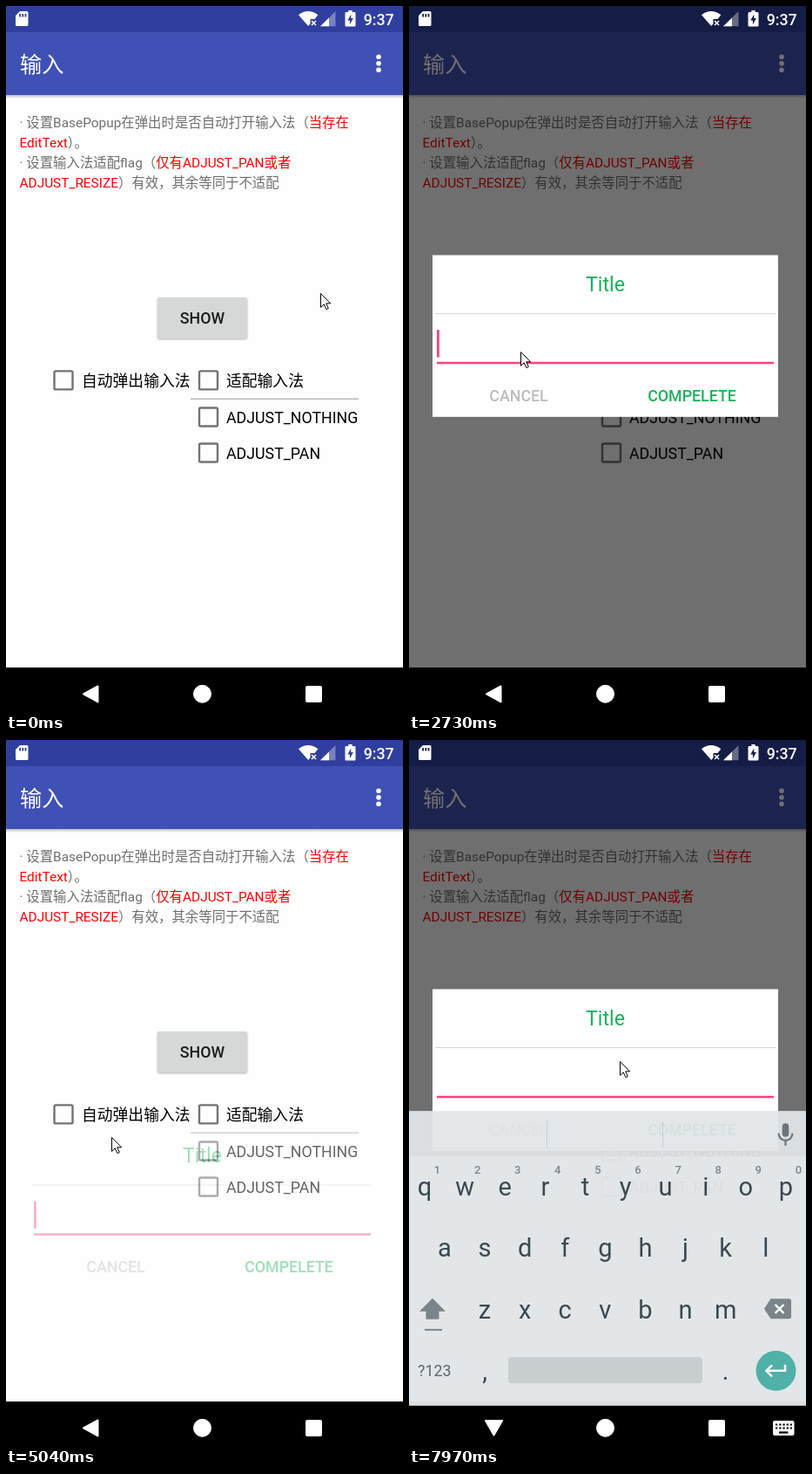
These frames come from a looping animation (456 by 809 pixels, 7990 ms). An HTML page:

```html
<!DOCTYPE html>
<html lang="zh-CN">
<head>
<meta charset="utf-8">
<style>
html, body { margin: 0; width: 100%; height: 100%; overflow: hidden; background: #000; }
svg { display: block; width: 456px; height: 809px; }
text { font-family: Roboto, 'Noto Sans CJK SC', 'Noto Sans CJK', sans-serif; font-size: 17.8px; white-space: pre; }
.med { font-weight: 500; }
.mid { text-anchor: middle; }
.note { font-size: 15.4px; fill: #6e6e6e; }
.note tspan { fill: #f00; }
.box { fill: none; stroke: #737373; stroke-width: 2.4; }
.key { font-size: 29px; fill: #37474f; text-anchor: middle; }
.hint { font-size: 13px; font-weight: 500; fill: #7d878c; text-anchor: middle; }
</style>
</head>
<body>
<svg viewBox="0 0 456 809" xmlns="http://www.w3.org/2000/svg">
  <defs>
    <linearGradient id="fall" x2="0" y2="1">
      <stop offset="0" stop-opacity=".32"/><stop offset="1" stop-opacity="0"/>
    </linearGradient>
  </defs>

  <g id="app">
    <rect width="456" height="758" fill="#fefefe"/>
    <rect y="101" width="456" height="5" fill="url(#fall)"/>
    <rect width="456" height="102" fill="#3f51b5"/>
    <rect width="456" height="30" fill="#303f9f"/>
    <text x="16" y="76" style="font-size:25.2px" fill="#fff">输入</text>
    <g fill="#fff">
      <circle cx="428" cy="58.3" r="2.8"/><circle cx="428" cy="65.8" r="2.8"/><circle cx="428" cy="73.3" r="2.8"/>
    </g>
    <text class="note" x="15.5" y="139">· 设置BasePopup在弹出时是否自动打开输入法（<tspan>当存在</tspan></text>
    <text class="note" x="15.5" y="162"><tspan>EditText</tspan>）。</text>
    <text class="note" x="15.5" y="185">· 设置输入法适配flag（<tspan>仅有ADJUST_PAN或者</tspan></text>
    <text class="note" x="15.5" y="208"><tspan>ADJUST_RESIZE</tspan>）有效，其余等同于不适配</text>
    <rect id="btn" x="174" y="334" width="103" height="47" rx="2" fill="#d6d7d7"/>
    <rect id="btnInk" x="174" y="334" width="103" height="47" rx="2" opacity="0"/>
    <text class="med mid" x="225.5" y="364" fill="#1c1c1c">SHOW</text>
    <path d="M212 450.2H405" stroke="#b9b9b9" stroke-width="1.6"/>
    <circle id="ripple" cx="66" cy="429" r="25" fill="#ff4081" opacity="0"/>
    <g id="boxes"></g>
    <g id="tick">
      <rect x="54.3" y="417.2" width="23.4" height="23.4" rx="2.5" fill="#ff4081"/>
      <path id="mark" d="M58.5 429.5l5.2 5.2L74 424" fill="none" stroke="#fff" stroke-width="2.4" stroke-dasharray="23"/>
    </g>
    <text x="87" y="435.5">自动弹出输入法</text>
    <text x="253" y="435.5">适配输入法</text>
    <text x="253" y="478">ADJUST_NOTHING</text>
    <text x="253" y="519">ADJUST_PAN</text>
  </g>

  <rect id="dim" width="456" height="758" opacity="0"/>

  <g id="dialog">
    <rect x="27" y="285.5" width="397" height="185.3" fill="#fff"/>
    <text class="mid" x="225.5" y="326.5" style="font-size:23.2px" fill="#1bb25c">Title</text>
    <path d="M30 352.5H421" stroke="#d6d6d6"/>
    <path id="line" d="M32 409H419"/>
    <rect id="caret" x="32" y="371" width="2.8" height="31.5" fill="#ff4081"/>
    <text class="med mid" x="126" y="452.5" fill="#bdbdbd">CANCEL</text>
    <text class="med mid" x="325" y="452.5" fill="#1bb25c">COMPELETE</text>
  </g>

  <g fill="#fff">
    <path fill-rule="evenodd" d="M16 6h8q1.5 0 1.5 1.5v14q0 1.5-1.500 1.500h-11.500q-1.500 0-1.500-1.500V11zM15.200 9v3.500h1.800V9zM18.400 9v3.500h1.800V9zM21.600 9v3.500h1.800V9z"/>
    <path d="M336 10.200Q347 1.800 358.300 10.200L354.500 15H349.500V20.300L347.200 23z"/>
    <path d="M351 17l5 5m0-5l-5 5" stroke="#fff" stroke-width="1.5"/>
    <path d="M361 23.200L378.500 6V23.200z" opacity=".35"/>
    <path d="M361 23.200L371 13.400V23.200z"/>
    <path fill-rule="evenodd" d="M393.300 5h4.400v2h2.600q1.200 0 1.200 1.200v14q0 1.200-1.200 1.200h-9.600q-1.200 0-1.200-1.200V8.200q0-1.200 1.200-1.200h2.600zM396.300 9.500l-4 7h2.600v4.800l4-7.300h-2.600z"/>
    <text class="med" x="410.700" y="21.500">9:37</text>
  </g>

  <rect y="758" width="456" height="51"/>
  <g id="keyboard">
    <rect y="420.500" width="456" height="388.500" fill="#eceff1"/>
    <rect y="420.500" width="456" height="51.500" fill="#e2e6e9"/>
    <rect y="758" width="456" height="140"/>
    <path d="M158.500 432v31M291.500 432v31" stroke="#c6cccf"/>
    <rect x="428.700" y="434.500" width="7.600" height="15.500" rx="3.800" fill="#6b767b"/>
    <path d="M424.500 446a8 8 0 0 0 16 0M432.500 454v6" fill="none" stroke="#6b767b" stroke-width="2.200"/>
    <g id="keys"></g>
    <path d="M27 635L42 650H34.500V659H19.500V650H12z" fill="#7b868b"/>
    <path d="M18 671H38" stroke="#7b868b" stroke-width="2"/>
    <path d="M415.500 635.500H436.500q2.500 0 2.500 2.500v18q0 2.500-2.500 2.500H415.500L408 647z" fill="#7b868b"/>
    <path d="M420.500 642l10 10m0-10l-10 10" stroke="#fff" stroke-width="2.400"/>
    <text x="10" y="724" fill="#5b686e">?123</text>
    <rect x="114" y="702.500" width="223" height="30" rx="4" fill="#cfd4d7"/>
    <circle cx="421.500" cy="718" r="23" fill="#4db6ac"/>
    <path d="M432 711v7H411M417 711.500l-6.500 6.500 6.500 6.500" fill="none" stroke="#fff" stroke-width="2.600"/>
  </g>

  <g fill="#fff" stroke="#fff" stroke-linejoin="round">
    <path id="back" stroke-width="2"/>
    <circle cx="225.500" cy="788.300" r="10"/>
    <rect x="344.500" y="779.500" width="18" height="18" rx="1"/>
  </g>
  <g id="switch">
    <rect x="418" y="780" width="24.500" height="17" rx="2" fill="#fff"/>
    <path d="M421 784.500h19M421 788.500h19" stroke="#000" stroke-width="2.200" stroke-dasharray="2.300 1.900"/>
    <path d="M425 793.500h10.500" stroke="#000" stroke-width="2.200"/>
  </g>

  <path id="mouse" d="M.5 .5V16.300L4.200 12.800L6.900 18.600L9.300 17.500L6.700 11.800H11.600z" fill="#fff" stroke="#000"/>
</svg>
<script>
const LOOP = 7990, REST_DIM = .56, SLIDE = 157.5;
const $ = id => document.getElementById(id);
const set = (id, attrs) => { for (const k in attrs) $(id).setAttribute(k, attrs[k]); };
const part = (t, start, len) => Math.min(1, Math.max(0, (t - start) / len));
const smooth = p => .5 - .5 * Math.cos(Math.PI * p);
const within = (t, a, b) => t >= a && t < b;

// time, x, y of the pointer tip
const path = [
  [30, 361, 329], [500, 235, 357], [1700, 235, 357], [2150, 150, 561], [2470, 125, 457],
  [2500, 125, 457], [2660, 128, 396], [2960, 128, 396], [3650, 94, 785], [3690, 94, 785],
  [3760, 95, 787], [4010, 95, 787], [4520, 115, 442], [4730, 115, 442], [5040, 121, 455],
  [5180, 112, 451], [5390, 112, 451], [5580, 62, 433], [6500, 62, 433], [7000, 239, 371],
  [7060, 239, 371], [7080, 242, 368]
];

function pointer(t) {
  const i = path.findIndex(p => p[0] > t);
  if (i < 0) return path[path.length - 1].slice(1);
  if (i === 0) return path[0].slice(1);
  const [a, b] = [path[i - 1], path[i]];
  const p = smooth(part(t, a[0], b[0] - a[0]));
  return [a[1] + (b[1] - a[1]) * p, a[2] + (b[2] - a[2]) * p];
}

function buildKeys() {
  const text = (cls, x, y, s) => `<text class="${cls}" x="${x}" y="${y}">${s}</text>`;
  const row = (s, x, y, cls = 'key') => [...s].map((c, i) => text(cls, x + i * 46.1, y, c)).join('');
  $('keys').innerHTML = row('qwertyuiop', 18, 517) + row('1234567890', 32.5, 492, 'hint') +
    row('asdfghjkl', 41, 587) + row('zxcvbnm', 87, 658) + text('key', 87, 728, ',') + text('key', 363.5, 728, '.');
  $('boxes').innerHTML = [[55.500, 418.400], [222, 418.400], [222, 460.500], [222, 501.500]]
    .map(([x, y]) => `<rect class="box" x="${x}" y="${y}" width="21" height="21" rx="1.5"/>`).join('');
}

function drawDialog(t) {
  const again = t >= 7390;
  const enter = smooth(part(t, again ? 7390 : 1150, 310));
  const leave = again ? 0 : smooth(part(t, 4705, 310));
  const shown = enter - leave;
  const fadeIn = 1 - (1 - part(t, again ? 7390 : 1150, 280)) ** 2;
  const fadeOut = again ? 0 : smooth(part(t, 4670, 290));
  const focus = again ? 7390 : 2690;
  const focused = t >= focus;
  const visible = within(t, 1165, 5055) || t >= 7395;
  set('dim', { opacity: visible ? REST_DIM * (fadeIn - fadeOut) : 0 });
  set('dialog', {
    display: visible ? 'inline' : 'none',
    opacity: .4 + .6 * shown,
    transform: `translate(0 ${SLIDE * (1 - shown)})`
  });
  set('line', { stroke: focused ? '#ff4081' : '#777', 'stroke-width': focused ? 2.6 : 1.2 });
  set('caret', { opacity: focused && (t - focus) % 1000 < 500 ? 1 : 0 });
}

function drawKeyboard(t) {
  const open = within(t, 2885, 3910) || t >= 7902;
  const start = t >= 7902 ? 7902 : 2885;
  const out = part(t, 3910, 150);
  const quint = len => (1 - part(t, start, len)) ** 5;
  const gone = 1 - (1 - out) ** 2;
  set('keyboard', {
    display: open || within(t, 3910, 4060) ? 'inline' : 'none',
    opacity: open ? 1 - quint(165) : 1 - gone,
    transform: `translate(0 ${40 * (open ? quint(200) : gone)})`
  });
  set('switch', { display: open ? 'inline' : 'none' });
  set('back', { d: open ? 'M88 780H107L97.500 796.500z' : 'M89 788.300L105.500 779.500V797.500z' });
}

function drawControls(t) {
  const press = t >= 7000 ? part(t, 7225, 40) - part(t, 7600, 100) : part(t, 965, 55) - part(t, 1400, 100);
  const ink = t >= 7000 ? part(t, 7385, 40) - part(t, 7500, 250) : part(t, 1150, 40) - part(t, 1260, 250);
  $('btn').style.filter = `drop-shadow(0 ${1 + 2 * press}px ${1 + 1.5 * press}px rgba(0,0,0,${.3 + .1 * press}))`;
  set('btnInk', { opacity: .12 * ink });
  const grow = part(t, 6220, 150);
  set('ripple', { r: 25 * Math.sqrt(grow), opacity: .2 * (grow - part(t, 6370, 250)) });
  set('tick', { opacity: part(t, 6270, 80) });
  set('mark', { 'stroke-dashoffset': 23 * (1 - part(t, 6310, 160)) });
}

function draw(t) {
  drawControls(t);
  drawDialog(t);
  drawKeyboard(t);
  set('mouse', { transform: `translate(${pointer(t).map(Math.round).join(' ')})` });
}

buildKeys();
draw(0);
const begin = performance.now();
(function tick() {
  draw((performance.now() - begin) % LOOP);
  requestAnimationFrame(tick);
})();
</script>
</body>
</html>
```
